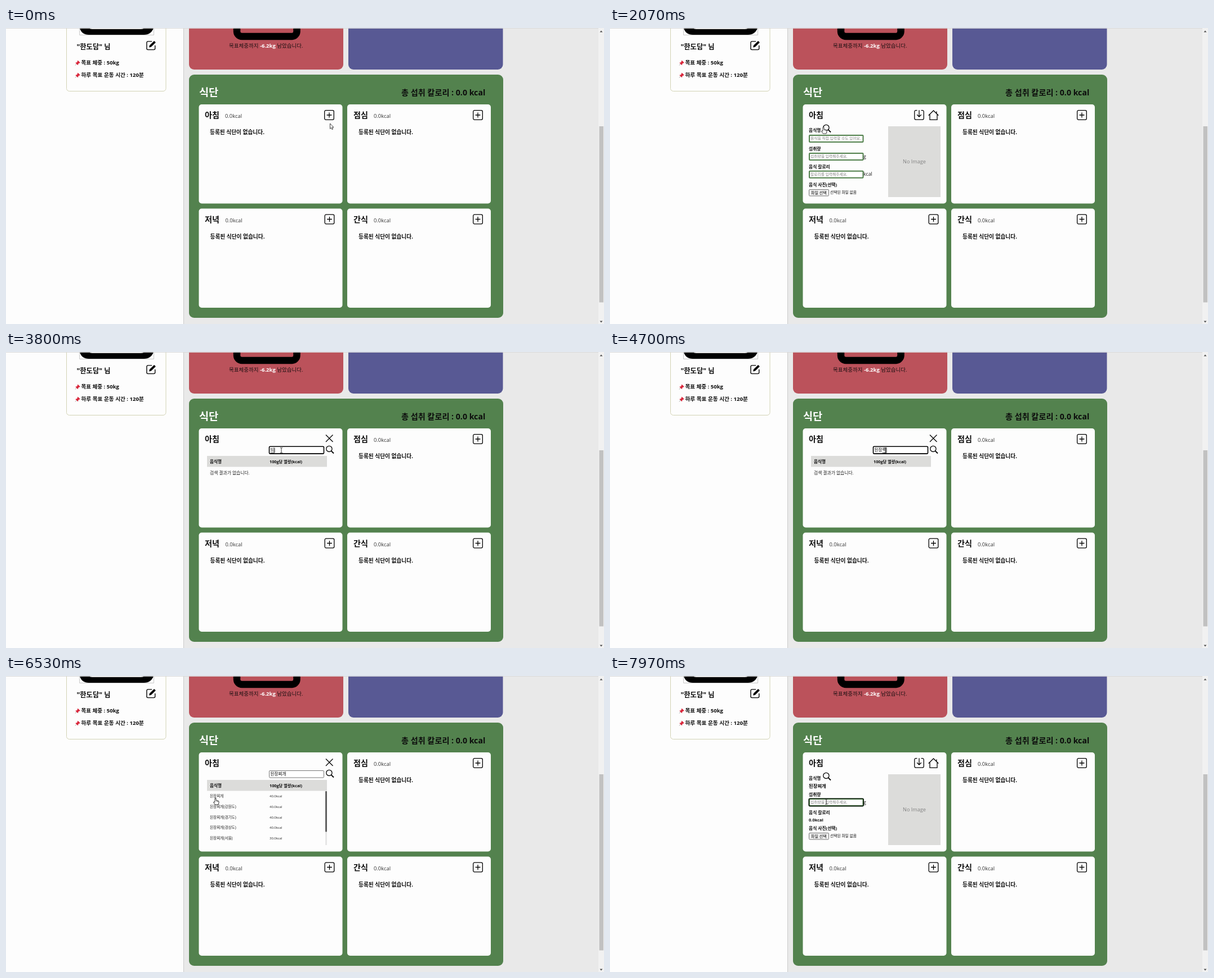
Animation, 1062 px wide and 527 px high, one loop 8000 ms. Source, as an HTML page:

```html
<!DOCTYPE html>
<html lang="ko">
<head>
<meta charset="utf-8">
<title>식단</title>
<style>
  html, body { margin: 0; width: 100%; height: 100%; overflow: hidden; background: #e9e9e9; }
  svg { display: block; }
  text { font-family: 'Open Sans', 'Noto Sans CJK KR', 'Noto Sans CJK', sans-serif; fill: #0c0c0c; white-space: pre; }
  .b { font-weight: 700; }
  .title { font-size: 14.1px; font-weight: 700; }
  .label { font-size: 7.75px; font-weight: 700; }
  .hint { font-size: 6.75px; fill: #808080; }
  .row text { font-size: 6.65px; fill: #222; }
  .row .cal { font-size: 5.95px; }
  .icon { fill: none; stroke: #000; stroke-width: 1.3; }
  .field { fill: #fff; stroke: #4f7f4a; stroke-width: 2; }
  .green { fill: #53824e; }
  .white { fill: #fdfdfd; }
  .grey { fill: #dcdcda; }

  .screen, .pointer > g { visibility: hidden; }
  .screen, .pointer, .pointer > g { animation: 8s step-end infinite; }
  #list { animation-name: list; }
  #form { animation-name: form; }
  #search { animation-name: search; }
  #results { animation-name: results; }
  #noResults, #focusBox { animation-name: before-results; }
  #chosen { animation-name: chosen; }
  #amountFocus { animation-name: amount; }
  @keyframes list { 0% { visibility: visible } 9.375%, 100% { visibility: hidden } }
  @keyframes form { 0% { visibility: hidden } 9.375% { visibility: visible } 29.125%, 100% { visibility: hidden } }
  @keyframes search { 0% { visibility: hidden } 29.125% { visibility: visible } 85.625%, 100% { visibility: hidden } }
  @keyframes before-results { 0% { visibility: hidden } 29.125% { visibility: visible } 70%, 100% { visibility: hidden } }
  @keyframes results { 0% { visibility: hidden } 70% { visibility: visible } 85.625%, 100% { visibility: hidden } }
  @keyframes chosen { 0% { visibility: hidden } 85.625%, 100% { visibility: visible } }
  @keyframes amount { 0% { visibility: hidden } 97%, 100% { visibility: visible } }

  .pointer { animation-name: travel; animation-timing-function: ease-in-out; }
  #arrow { animation-name: arrow; }
  #hand { animation-name: hand; }
  #beam { animation-name: beam; }
  @keyframes travel {
    0% { transform: translate(575px, 170px) }
    4.5%, 9.4% { transform: translate(574px, 158px) }
    13.3%, 14% { transform: translate(567px, 166px) }
    23.5%, 29.2% { transform: translate(379px, 176px) }
    33.5%, 37% { transform: translate(486px, 175px) }
    42%, 62.5% { transform: translate(489px, 175px) }
    67%, 70.6% { transform: translate(573px, 174px) }
    79.5%, 86% { transform: translate(372px, 217px) }
    95%, 100% { transform: translate(384px, 224px) }
  }
  @keyframes arrow {
    0% { visibility: visible } 3% { visibility: hidden }
    15% { visibility: visible } 22.8% { visibility: hidden }
    29.125% { visibility: visible } 32% { visibility: hidden }
    71.5% { visibility: visible } 78% { visibility: hidden }
    100% { visibility: hidden }
  }
  @keyframes hand {
    0% { visibility: hidden } 3% { visibility: visible } 15% { visibility: hidden }
    22.8% { visibility: visible } 29.125% { visibility: hidden }
    66% { visibility: visible } 71.5% { visibility: hidden }
    78% { visibility: visible } 86% { visibility: hidden }
    100% { visibility: hidden }
  }
  @keyframes beam {
    0% { visibility: hidden } 32% { visibility: visible } 66% { visibility: hidden }
    86%, 100% { visibility: visible }
  }
</style>
</head>
<body>
<svg width="1062" height="527" viewBox="0 0 1062 527">
  <defs>
    <g id="plus" class="icon">
      <rect x=".7" y=".7" width="16.6" height="16.6" rx="2.2"/>
      <path d="M9 4.6v8.8M4.6 9h8.8"/>
    </g>
    <g id="lens" class="icon">
      <circle cx="5.9" cy="5.9" r="5.1"/>
      <path d="M9.6 9.6 14 14" stroke-width="1.8"/>
    </g>
    <g id="save" class="icon">
      <path d="M5.5 .7H3a2.2 2.2 0 0 0-2.2 2.2V15a2.2 2.2 0 0 0 2.2 2.2h12A2.2 2.2 0 0 0 17.2 15V2.9A2.2 2.2 0 0 0 15 .7H12.5M9 .2v11.6M5.2 8.2 9 12l3.8-3.8"/>
    </g>
    <g id="home" class="icon">
      <path d="M.6 9.8 9.5 1l8.9 8.8M3 8v9.3h13V8M14.9 6V2.4"/>
    </g>
    <g id="pin">
      <path d="M4.6 .2 8.8 4.2 7.8 5 6.8 4.9 5.2 6.6 5.1 8.2 4.4 8.6 .4 4.7 .9 4 2.4 3.9 4 2.2 3.8 1.1Z" fill="#d9253a"/>
      <path d="M2.2 6.7.2 8.9" stroke="#777" stroke-width=".8"/>
    </g>
    <rect id="card" class="white" width="255" height="176.5" rx="5"/>
    <g id="empty">
      <text x="47" y="24" font-size="9.4" style="fill:#333">0.0kcal</text>
      <text x="20" y="53" font-size="9.7" class="b">등록된 식단이 없습니다.</text>
      <use href="#plus" x="223" y="10"/>
    </g>
    <g id="formTop">
      <use href="#save" x="540" y="146"/>
      <use href="#home" x="565" y="146"/>
      <text x="353" y="184.5" class="label">음식명</text>
      <use href="#lens" x="378" y="171.5"/>
      <rect class="grey" x="494" y="175" width="93" height="126"/>
      <text x="520" y="241.3" font-size="9.15" style="fill:#828282">No Image</text>
    </g>
    <g id="amountField">
      <text x="353" y="217.5" class="label">섭취량</text>
      <rect class="field" x="354" y="223" width="95.5" height="12" rx="1"/>
      <text x="356" y="231.4" class="hint">섭취량을 입력해주세요.</text>
      <text x="450" y="231.5" font-size="8.8" style="fill:#222">g</text>
      <text x="353" y="249.5" class="label">음식 칼로리</text>
    </g>
    <g id="fileField">
      <text x="353" y="281.7" class="label">음식 사진(선택)</text>
      <rect x="353.5" y="287.5" width="35" height="11.5" rx="1.5" fill="#efefef" stroke="#767676"/>
      <text x="357" y="295.7" font-size="7">파일 선택</text>
      <text x="391" y="295.4" font-size="6.75">선택된 파일 없음</text>
    </g>
  </defs>

  <!-- profile -->
  <rect width="1062" height="527" fill="#e9e9e9"/>
  <rect class="white" width="315" height="527"/>
  <path d="M315.5 0V527" stroke="#cbcbcb"/>
  <rect x="107.5" y="-20" width="176.5" height="132.5" rx="5" fill="#fdfdfd" stroke="#d2d3b4"/>
  <path d="M130.5 0V12.5H262.5V0" fill="none" stroke="#c9c9c9"/>
  <path d="M131 0H262Q258 12 245 12H147Q134 12 131 0Z"/>
  <path d="M147 0Q149 2 153 2H240Q244 2 246 0" fill="#fdfdfd"/>
  <text x="125.5" y="38" font-size="12.3" class="b">"한도담" 님</text>
  <g transform="translate(249 22.5) scale(1.07)">
    <path d="M9.5 1.3H2.8A1.9 1.9 0 0 0 .9 3.2V13.2A1.9 1.9 0 0 0 2.8 15.1H12.8A1.9 1.9 0 0 0 14.7 13.2V8" class="icon"/>
    <path d="M13.2.4 15.8 3 8.2 10.6 4.8 11.3 5.5 8Z"/>
  </g>
  <use href="#pin" x="123" y="57.5"/>
  <text x="133.5" y="65" font-size="9.55" class="b">목표 체중 : 50kg</text>
  <use href="#pin" x="123" y="79.5"/>
  <text x="133.5" y="87" font-size="9.65" class="b">하루 목표 운동 시간 : 120분</text>

  <!-- summary -->
  <rect x="325" y="-20" width="274" height="94" rx="9" fill="#bb525b"/>
  <rect x="608" y="-20" width="274.5" height="94" rx="9" fill="#585994"/>
  <rect x="410" y="-30" width="106.5" height="45" rx="9" fill="none" stroke="#000" stroke-width="12.5"/>
  <text x="396" y="35.3" font-size="9.5" style="fill:#1c1012">목표체중까지 <tspan class="b" fill="#fff">-6.2kg</tspan> 남았습니다.</text>

  <!-- meals -->
  <rect class="green" x="325" y="83" width="558" height="433" rx="9"/>
  <text x="343" y="121" font-size="18.6" class="b" style="fill:#fff">식단</text>
  <text x="702" y="120.3" font-size="14.15" class="b">총 섭취 칼로리 : 0.0 kcal</text>
  <g transform="translate(342.5 136)"><use href="#card"/><text class="title" x="10.5" y="24">아침</text></g>
  <g transform="translate(606 136)"><use href="#card"/><text class="title" x="11" y="24">점심</text><use href="#empty"/></g>
  <g transform="translate(342.5 321.5)"><use href="#card"/><text class="title" x="10.5" y="24">저녁</text><use href="#empty"/></g>
  <g transform="translate(606 321.5)"><use href="#card"/><text class="title" x="11" y="24">간식</text><use href="#empty"/></g>

  <g id="list" class="screen"><use href="#empty" x="342" y="136"/></g>

  <g id="form" class="screen">
    <use href="#formTop"/>
    <rect class="field" x="354" y="191" width="95.5" height="12" rx="1"/>
    <text x="356" y="199.4" class="hint">음식을 직접 입력할 수도 있어요.</text>
    <use href="#amountField"/>
    <rect class="field" x="354" y="254.7" width="95.5" height="12" rx="1"/>
    <text x="356" y="263.1" class="hint">칼로리를 입력해주세요.</text>
    <text x="450" y="263" font-size="8.8" style="fill:#222">kcal</text>
    <use href="#fileField"/>
  </g>

  <g id="search" class="screen">
    <path d="M568 147.5 580.5 160M580.5 147.5 568 160" class="icon"/>
    <use href="#lens" x="568" y="166.5"/>
    <rect x="467.5" y="168.5" width="97" height="12.5" rx="1.5" fill="#fff" stroke="#777"/>
    <rect id="focusBox" class="screen" x="467.5" y="168.3" width="97" height="12.8" rx="1.5" fill="none" stroke="#000" stroke-width="1.6"/>
    <text id="hint" x="469.5" y="177.4" font-size="7.7" style="fill:#808080">음식 이름을 검색해주세요.</text>
    <text id="query" x="469.5" y="177.4" font-size="7.6"></text>
    <path id="underline" stroke="#222" stroke-width=".8"/>
    <path id="caret" stroke="#000" stroke-width=".9"/>
    <rect class="grey" x="357" y="185" width="213" height="19.5"/>
    <text x="362" y="197.8" font-size="7.6" class="b">음식명</text>
    <text x="468" y="197.8" font-size="7.25" class="b">100g당 열량(kcal)</text>
    <text id="noResults" class="screen" x="362" y="217.6" font-size="7.8" style="fill:#222">검색 결과가 없습니다.</text>
    <g id="results" class="screen">
      <rect x="567" y="205" width="3" height="96" fill="#e6e6e6"/>
      <rect x="567" y="205" width="3" height="72.5" rx="1" fill="#606060"/>
      <g id="rows" class="row"></g>
    </g>
  </g>

  <g id="chosen" class="screen">
    <use href="#formTop"/>
    <text x="353" y="199" font-size="8.4" class="b">된장찌개</text>
    <use href="#amountField" y="-4"/>
    <rect id="amountFocus" class="screen" x="353.2" y="218.2" width="97" height="13.4" rx="2" fill="none" stroke="#0b1c0b" stroke-width="1.6"/>
    <text x="353" y="258.6" font-size="7.5" class="b">0.0kcal</text>
    <use href="#fileField" y="-8"/>
  </g>

  <!-- window edge and scrollbar -->
  <rect width="1062" height="1" fill="#dadada"/>
  <rect x="1052" width="10" height="527" fill="#f1f1f1"/>
  <rect x="1053.5" y="175" width="7.5" height="313.5" fill="#c1c1c1"/>
  <path d="M1054.5 7.5h5l-2.5-3ZM1054.5 521.5h5l-2.5 3Z" fill="#505050"/>

  <g class="pointer">
    <g id="arrow">
      <path d="M.5 0V9.4L2.6 7.5 4 10.7 5.6 10 4.2 6.9H7Z" fill="#fff" stroke="#111" stroke-width=".8"/>
    </g>
    <g id="hand">
      <path d="M-1 .8Q0-.5 1 .8V4.6L5 5.3Q6 5.6 6 6.7V9L5 12H-.7L-3.6 7.8Q-3.4 6.4-1 7.6Z" fill="#fff" stroke="#111" stroke-width=".85"/>
      <path d="M2.6 5v2M4.3 5.3v2" stroke="#111" stroke-width=".6"/>
    </g>
    <g id="beam">
      <path d="M-2-4.6Q0-4.6 0-3.6Q0-4.6 2-4.6M0-3.6V3.6M-2 4.6Q0 4.6 0 3.6Q0 4.6 2 4.6" fill="none" stroke="#222" stroke-width=".9"/>
    </g>
  </g>
</svg>
<script>
  const LOOP = 8000, FOCUS = 2750, BLUR = 5600, TYPE_START = 3450, KEY_GAP = 130;
  const stages = ['', 'ㄷ', '도', '되', '된', '된ㅈ', '된자', '된장', '된장ㅉ', '된장찌', '된장찍', '된장찌개'];
  const $ = id => document.getElementById(id);
  const [query, hint, caret, underline] = ['query', 'hint', 'caret', 'underline'].map($);

  $('rows').innerHTML = ['', '(강원도)', '(경기도)', '(경상도)', '(서울)'].map((place, i) => {
    const y = 216.2 + i * 18.65;
    return `<text x="362" y="${y}">된장찌개${place}</text>
      <text class="cal" x="468" y="${y}">${i < 4 ? 40 : 30}.0kcal</text>`;
  }).join('');

  let start;
  function draw(now) {
    start ??= now;
    const t = (now - start) % LOOP;
    const keys = Math.floor((t - TYPE_START) / KEY_GAP) + 1;
    const typed = stages[Math.max(0, Math.min(keys, stages.length - 1))];
    if (query.textContent !== typed) query.textContent = typed;
    hint.style.display = typed ? 'none' : '';

    const focused = t >= FOCUS && t < BLUR;
    const end = 470 + (typed ? query.getComputedTextLength() : 0);
    const blink = (t - FOCUS) % 1000 < 500;
    caret.setAttribute('d', focused && (blink || keys > 0 && t < 4900) ? `M${end} 170.5V179` : '');
    underline.setAttribute('d', focused && typed ? `M${end - 7.2} 179.4H${end}` : '');
    requestAnimationFrame(draw);
  }
  requestAnimationFrame(draw);
</script>
</body>
</html>
```
